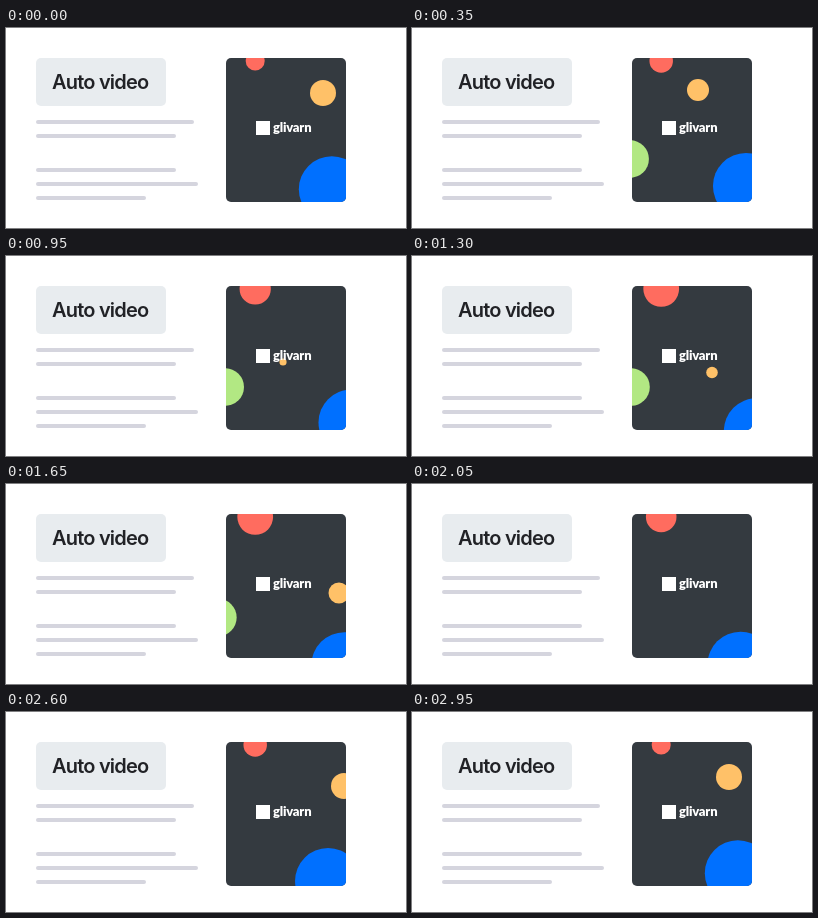
Recreate the animation shown at these times as an HTML page. Size 400 by 200 pixels, loop 3000 ms.

```html
<!DOCTYPE html>
<html lang="en">
<head>
<meta charset="utf-8">
<title>Auto video</title>
<style>
  html, body { margin: 0; width: 100%; height: 100%; overflow: hidden; background: #fff; }
  svg { display: block; width: 400px; height: 200px; }
  .title { font: 600 20px Inter, sans-serif; letter-spacing: -0.8px; fill: #212226; }
  .brand { font: 900 13px Lato, sans-serif; letter-spacing: -0.2px; fill: #fff; }
</style>
</head>
<body>
<svg viewBox="0 0 400 200">
  <clipPath id="card"><rect x="220" y="30" width="120" height="144" rx="5"/></clipPath>

  <rect x="30" y="30" width="130" height="48" rx="5" fill="#e8ecef"/>
  <text class="title" x="46" y="61">Auto video</text>
  <g fill="#d5d5de">
    <rect x="30" y="92" width="158" height="4" rx="2"/>
    <rect x="30" y="106" width="140" height="4" rx="2"/>
    <rect x="30" y="140" width="140" height="4" rx="2"/>
    <rect x="30" y="154" width="162" height="4" rx="2"/>
    <rect x="30" y="168" width="110" height="4" rx="2"/>
  </g>

  <g clip-path="url(#card)">
    <rect x="220" y="30" width="120" height="144" fill="#343a40"/>
    <circle id="red" fill="#ff6c5f"/>
    <circle id="green" fill="#b2e883"/>
    <circle id="blue" fill="#0070ff"/>
    <circle id="yellow" fill="#ffc168"/>
    <rect x="250" y="93" width="14" height="14" fill="#fff"/>
    <text class="brand" x="267" y="104">glivarn</text>
  </g>
</svg>
<script>
  const LOOP = 3000, STEP = 50, SPAN = LOOP - STEP;
  const [red, green, blue, yellow] =
    ['red', 'green', 'blue', 'yellow'].map(id => document.getElementById(id));

  // time, x, y, radius
  const path = [
    [0, 317, 65, 13], [350, 286, 62, 11], [650, 272, 82, 7.2],
    [950, 277, 106, 3.6], [1300, 300, 116.5, 5.8], [1650, 333, 109, 10.5],
    [2050, 355, 98, 12.6], [2300, 354, 85, 13], [2600, 338, 74, 13],
    [SPAN, 317, 65, 13]
  ];

  const last = path.length - 1;
  const knot = i =>
    i < 0 ? [path[last - 1][0] - SPAN, ...path[last - 1].slice(1)] :
    i > last ? [path[1][0] + SPAN, ...path[1].slice(1)] : path[i];

  // Smooth closed curve through the knots
  function follow(t) {
    let i = 0;
    while (i < last - 1 && t >= path[i + 1][0]) i++;
    const [a, b, c, d] = [-1, 0, 1, 2].map(k => knot(i + k));
    const dt = c[0] - b[0], u = (t - b[0]) / dt, u2 = u * u, u3 = u2 * u;
    return [1, 2, 3].map(k => {
      const m0 = (c[k] - a[k]) / (c[0] - a[0]) * dt;
      const m1 = (d[k] - b[k]) / (d[0] - b[0]) * dt;
      return (2 * u3 - 3 * u2 + 1) * b[k] + (u3 - 2 * u2 + u) * m0 +
             (3 * u2 - 2 * u3) * c[k] + (u3 - u2) * m1;
    });
  }

  function place(el, x, y, r) {
    el.setAttribute('cx', x);
    el.setAttribute('cy', y);
    el.setAttribute('r', Math.max(0, r));
  }

  function draw(t) {
    const p = t / SPAN;

    place(red, 249.2, 33, 9.5 * (2 - Math.abs(1 - 2 * p)));

    const angle = (227 + 360 * p) * Math.PI / 180;
    place(blue, 334 + 12 * Math.cos(angle), 170 + 12 * Math.sin(angle), 33);

    const enter = Math.max(0, 1 - t / 590) ** 4;
    const leave = Math.min(1, Math.max(0, (t - 1150) / 880)) ** 3;
    place(green, 219.2 - 40 * (enter + leave), 131 + 14 * leave, 18.8);

    place(yellow, ...follow(t));
  }

  const start = performance.now();
  function tick() {
    const t = (performance.now() - start) % LOOP;
    draw(Math.floor(t / STEP) * STEP);
    requestAnimationFrame(tick);
  }
  tick();
</script>
</body>
</html>
```
